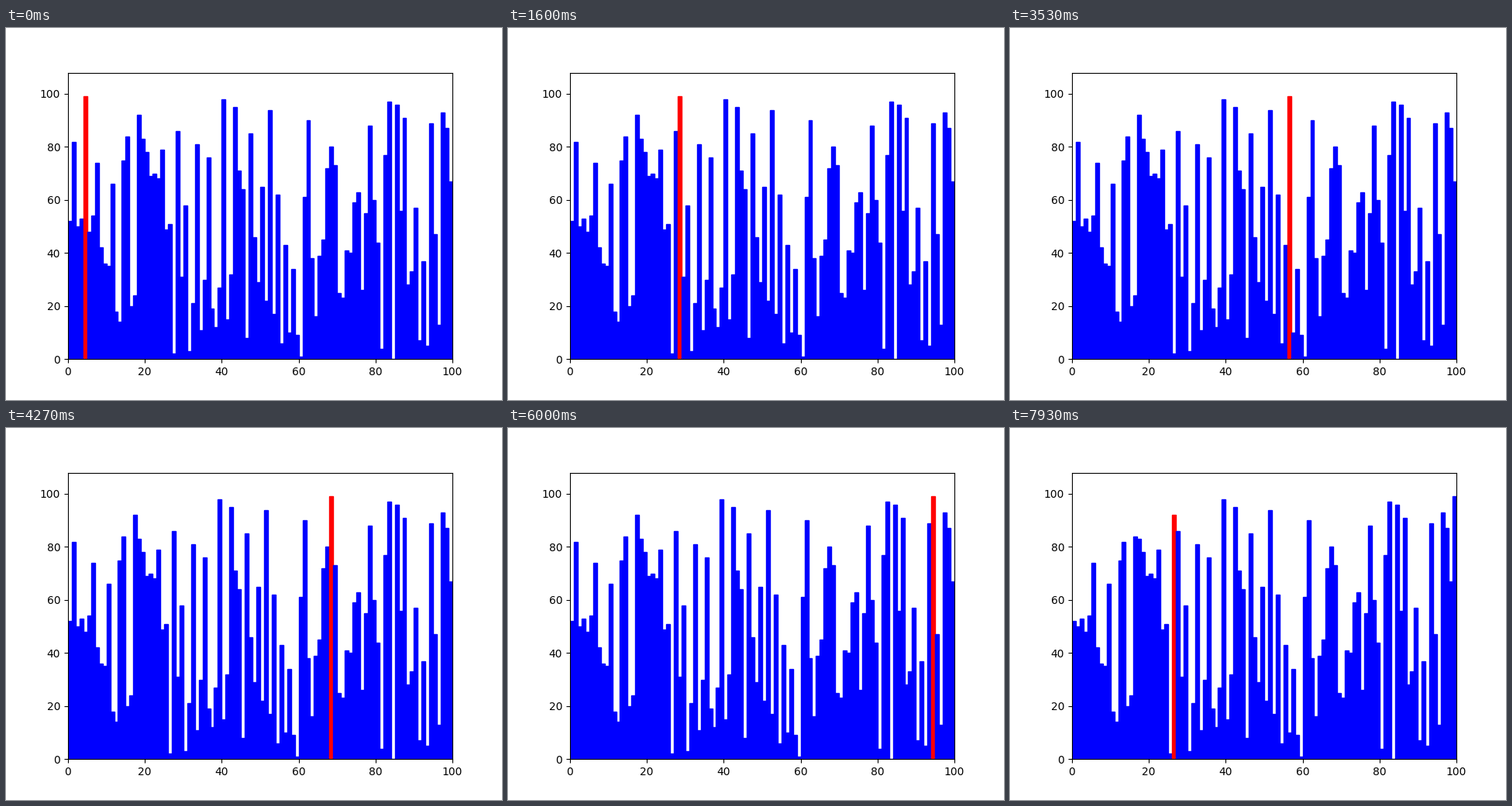
Recreate the animation shown at these times as a matplotlib script. Size 640 px wide and 480 px high, loop 8 s.

```python
import matplotlib.pyplot as plt
from matplotlib.animation import FuncAnimation

FRAMES = 120
LOOP_MS = 8000

# Order of the bars at the start, during the first bubble-sort pass
START = [
    52, 82, 50, 53, 99, 48, 54, 74, 42, 36, 35, 66, 18, 14, 75, 84, 20, 24, 92, 83,
    78, 69, 70, 68, 79, 49, 51, 2, 86, 31, 58, 3, 21, 81, 11, 30, 76, 19, 12, 27,
    98, 15, 32, 95, 71, 64, 8, 85, 46, 29, 65, 22, 94, 17, 62, 6, 43, 10, 34, 9,
    1, 61, 90, 38, 16, 39, 45, 72, 80, 73, 25, 23, 41, 40, 59, 63, 26, 55, 88, 60,
    44, 4, 77, 97, 0, 96, 56, 91, 28, 33, 57, 7, 37, 5, 89, 47, 13, 93, 87, 67,
]
START_POS = 4


def bubble_steps(values, pos):
    """Yield (values, moved position) for the start and after each swap."""
    values = list(values)
    yield values[:], pos
    end = len(values) - 1
    while end > 0:
        for j in range(pos, end):
            if values[j] > values[j + 1]:
                values[j], values[j + 1] = values[j + 1], values[j]
                yield values[:], j + 1
        pos = 0
        end -= 1


steps = [step for _, step in zip(range(FRAMES), bubble_steps(START, START_POS))]

fig, ax = plt.subplots(figsize=(6.4, 4.8), dpi=100)
n = len(START)
bars = ax.bar(range(n), START, width=1, align="edge", color="blue")
ax.set_xlim(0, n)
ax.set_ylim(0, int(1.1 * max(START)))


def update(frame):
    values, moved = steps[frame]
    for i, (bar, value) in enumerate(zip(bars, values)):
        bar.set_height(value)
        bar.set_color("red" if i == moved else "blue")
    return list(bars)


anim = FuncAnimation(fig, update, frames=FRAMES, init_func=lambda: update(0),
                     interval=LOOP_MS / FRAMES, repeat=True, repeat_delay=0)
plt.show()
```
